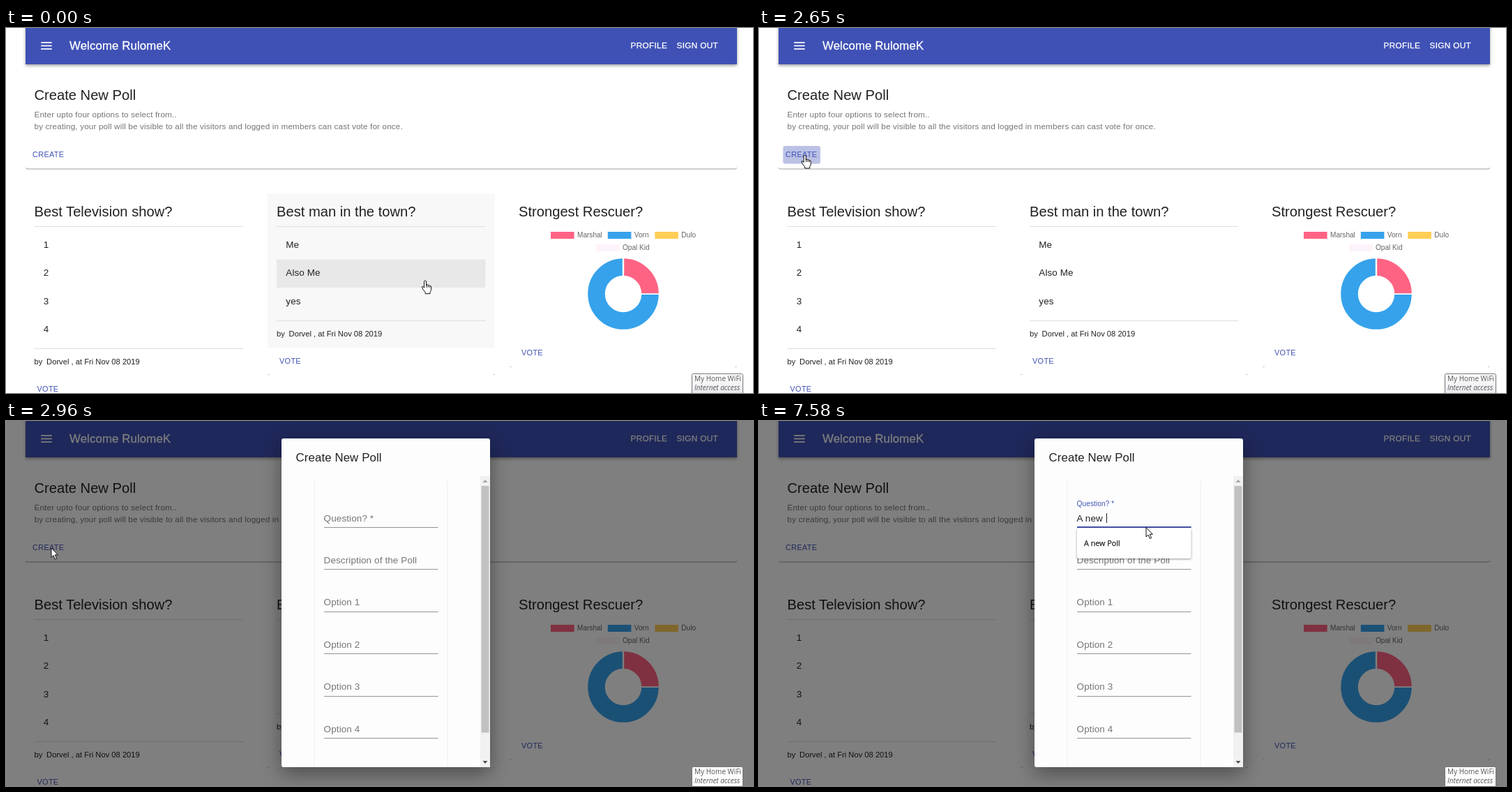
An HTML page for the animation above (8000 ms loop, 1071 by 523 pixels).

```html
<!DOCTYPE html>
<html lang="en">
<head>
<meta charset="utf-8">
<title>Poll board</title>
<style>
  html, body { margin: 0; width: 100%; height: 100%; overflow: hidden; background: #fff; }
  svg { display: block; width: 1071px; height: 523px; }
  text { font-family: "Liberation Sans", Arial, sans-serif; white-space: pre; }
  .ui { font-family: "Open Sans", "Noto Sans", sans-serif; }
  .bar { filter: drop-shadow(0 2px 2px rgba(0,0,0,.38)); }
  .card { filter: drop-shadow(0 1px .4px rgba(0,0,0,.38)); }
  .paper { filter: drop-shadow(0 9px 14px rgba(0,0,0,.4)); }
  .menu { filter: drop-shadow(0 1px 1.5px rgba(0,0,0,.4)); }
</style>
</head>
<body>
<script>
const LOOP = 8000, DARK = '#212121', GREY = '#757575', BLUE = '#3f51b5';

// ---- markup helpers ----
const rect = (x, y, w, h, fill, more = '') =>
  `<rect x="${x}" y="${y}" width="${w}" height="${h}" fill="${fill}" ${more}/>`;
// baselines sit on whole pixels
const text = (x, y, size, str, fill = DARK, spacing = 0, more = '') =>
  `<text x="${x}" y="${Math.floor(y)}" font-size="${size}" fill="${fill}" letter-spacing="${spacing * size}" ${more}>${str}</text>`;
const heading = (x, y, str) => text(x, y, 20.16, str);
const body = (x, y, str, fill, more) => text(x, y, 13.44, str, fill, .0094, more);
const note = (y, str) => text(40.5, y, 11.76, str, GREY, .0107);
const button = (x, y, str) => text(x, y, 10.92, str, BLUE, .0286);
const barText = (x, y, size, str, spacing) =>
  text(x, y, size, str, '#fff', spacing, 'stroke="#fff" stroke-width=".3"');

function pollCard(x, title, options) {
  const end = Math.floor(298.5 + options.length * 40.3);
  return heading(x, 270, title) +
    rect(x, 284, 299.5, 1, '#dedede') +
    options.map((o, i) => body(x + 13.3, 315.4 + i * 40.3, o)).join('') +
    rect(x, end, 299.5, 1, '#dedede') +
    text(x, end + 23, 11.2, 'by') +
    text(x + 17.6, end + 23, 11.2, 'Dorvel , at Fri Nov 08 2019') +
    button(x + 4, end + 62, 'VOTE');
}

const legend = (x, y, color, name) =>
  rect(x, y, 33.6, 10, color) + text(x + 38, y + 8, 10.08, name, '#666');

const corners = (x, y) => rect(x, y, 3, 1, '#ccc') + rect(x + 323, y, 3, 1, '#ccc');

const ring = (color, share, turn) =>
  `<circle cx="885" cy="381" r="38.5" fill="none" stroke="${color}" stroke-width="24.5" pathLength="4"
    stroke-dasharray="${share} 4" transform="rotate(${turn} 885 381)"/>`;

const field = (name, i) =>
  body(455.6, 144 + i * 60.4, name, GREY) + rect(456, Math.round(152 + i * 60.4), 163.5, 1, '#949494');

const page =
  rect(28, -10, 1020, 62, BLUE, 'class="bar"') +
  [20, 24.6, 29.2].map(y => rect(50.2, y, 15.5, 1.7, '#fff')).join('') +
  barText(91, 31, 16.8, 'Welcome RulomeK', .0075) +
  barText(895.5, 29, 11.76, 'PROFILE', .0286) +
  barText(961.5, 29, 11.76, 'SIGN OUT', .0286) +

  rect(28, 69, 1020, 132.5, '#fff', 'rx="3" class="card"') +
  heading(40.5, 103, 'Create New Poll') +
  note(128, 'Enter upto four options to select from..') +
  note(145, 'by creating, your poll will be visible to all the visitors and logged in members can cast vote for once.') +
  `<clipPath id="buttonClip">${rect(34.5, 169, 53.5, 25.5, '#000', 'rx="3"')}</clipPath>` +
  rect(34.5, 169, 53.5, 25.5, BLUE, 'rx="3" id="buttonHover"') +
  `<g clip-path="url(#buttonClip)"><circle id="ripple" cx="64.5" cy="182" fill="${BLUE}"/></g>` +
  button(38, 185, 'CREATE') +

  pollCard(40.5, 'Best Television show?', ['1', '2', '3', '4']) +
  rect(374.7, 237, 326.3, 222, '#000', 'id="cardHover"') +
  rect(388, 331.7, 299.5, 40.3, '#000', 'id="itemHover"') +
  rect(388, 291.4, 299.5, 40.3, '#000', 'id="firstHover"') +
  pollCard(388, 'Best man in the town?', ['Me', 'Also Me', 'yes']) +
  corners(375, 496) +

  heading(735, 270, 'Strongest Rescuer?') +
  legend(781, 292, '#ff6384', 'Marshal') +
  legend(862.8, 292, '#36a2eb', 'Vorn') +
  legend(930.3, 292, '#ffce56', 'Dulo') +
  legend(846, 310, '#fdf3fa', 'Opal Kid') +
  ring('#ff6384', 1, -90) + ring('#36a2eb', 3, 0) +
  rect(883.8, 329, 2.4, 28, '#fff') + rect(909, 380.2, 28, 1.8, '#fff') +
  button(739, 469, 'VOTE') +
  corners(722, 485);

const dialog =
  rect(395, 25, 299, 471, '#fdfdfd', 'rx="3" class="paper"') +
  text(415.5, 58, 16.8, 'Create New Poll', DARK, .0075) +
  rect(441.5, 86, 1, 410, '#efefef') + rect(632.5, 86, 1, 410, '#efefef') +
  rect(680, 79, 14, 417, '#f1f1f1') + rect(681.5, 93, 11, 353.5, '#c1c1c1') +
  '<path d="M683.5 88l3.5-4 3.5 4z" fill="#a3a3a3"/><path d="M683.5 487l3.5 4 3.5-4z" fill="#505050"/>' +
  ['Description of the Poll', 'Option 1', 'Option 2', 'Option 3', 'Option 4']
    .map((name, i) => field(name, i + 1)).join('') +
  body(0, 0, 'Question? *', GREY, 'id="label"') +
  rect(456, 152, 163.5, 1, '#949494', 'id="line"') +
  rect(0, 151.2, 0, 1.8, '#303f9f', 'id="focusLine"') +
  body(455.6, 144, '', DARK, 'id="typed"') +
  rect(0, 132, 1, 14, DARK, 'id="caret"') +
  '<g id="menu">' + rect(456, 154, 163.5, 43, '#fff', 'rx="2" class="menu"') +
  text(466, 179, 10.8, 'A new Poll', '#222', 0, 'class="ui" stroke="#222" stroke-width=".25"') + '</g>';

const tooltip =
  '<linearGradient id="tipShade" x2="0" y2="1"><stop stop-color="#fff"/><stop offset="1" stop-color="#e4e5ec"/></linearGradient>' +
  rect(983.5, 495.5, 73, 34, '', 'id="tip" rx="2" stroke="#767676"') +
  text(987, 506, 10, 'My Home WiFi', '#575757', 0, 'class="ui"') +
  text(987, 519, 10, 'Internet access', '#575757', 0, 'class="ui" font-style="italic"');

const pointer =
  '<g id="pointer"><circle id="click" r="10" cx="-.3" cy=".4" fill="#f7ee1c" opacity=".75"/>' +
  '<g fill="#fff" stroke="#111" stroke-linejoin="round">' +
  '<path id="arrow" d="M0 0V13.5L3.1 10.6 5.4 16 7.6 15 5.3 9.8H9.3Z"/>' +
  '<path id="hand" transform="translate(.7)" d="M-1.5 1.2Q0-.8 1.5 1.2V7l.6-.9q1.6-.6 2.3.8 1.6-.6 2.2.8 1.9-.3 2 1.5v4.5l-1.5 3v2.3h-7v-2L-3 13-4.6 10q-.3-2 1.8-1l1.3 1.5zM2 6v4M4.4 7v3M6.6 8v2"/>' +
  '<path id="beam" fill="none" d="M-2.5-5.5H0H3.5M.5-5.5V7M-2.5 7H3.5"/></g></g>';

document.body.innerHTML =
  `<svg viewBox="0 0 1071 523">${page}${rect(0, 0, 1071, 523, '#000', 'id="shade"')}
  <g id="dialog">${dialog}</g>${tooltip}${pointer}</svg>`;

// ---- motion helpers ----
const el = {};
document.querySelectorAll('[id]').forEach(n => el[n.id] = n);
const set = (id, attrs) => { for (const k in attrs) el[id].setAttribute(k, attrs[k]); };
const show = (id, on) => set(id, { visibility: on ? 'visible' : 'hidden' });
const within = (t, a, b) => t >= a && t < b;
const ramp = (t, a, b) => Math.min(1, Math.max(0, (t - a) / (b - a)));

// cubic-bezier(.4, 0, .2, 1)
function ease(x) {
  let lo = 0, hi = 1;
  for (let i = 0; i < 18; i++) {
    const s = (lo + hi) / 2, r = 1 - s;
    if (1.2 * r * r * s + .6 * r * s * s + s ** 3 < x) lo = s; else hi = s;
  }
  return lo * lo * (3 - 2 * lo);
}

const route = [[0, 601, 362], [440, 295, 230], [570, 295, 230], [1360, 65, 182],
  [3340, 65, 182], [3570, 357, 143], [3720, 357, 143], [4220, 555, 152.5], [LOOP, 555, 152.5]];
function pointerAt(t) {
  const i = Math.max(1, route.findIndex(k => t < k[0]));
  const [a, ax, ay] = route[i - 1], [b, bx, by] = route[i], p = ramp(t, a, b);
  return [ax + (bx - ax) * p, ay + (by - ay) * p];
}

const keys = [[6070, 'A'], [6150, 'A '], [7180, 'A n'], [7250, 'A ne'], [7410, 'A new'], [7580, 'A new ']];
const glyphs = document.createElement('canvas').getContext('2d');
glyphs.font = '13.44px "Liberation Sans", Arial, sans-serif';

function draw(t) {
  const [x, y] = pointerAt(t), open = t >= 2800;

  set('cardHover', { opacity: .027 * (1 - ramp(t, 290, 430)) });
  set('itemHover', { opacity: .065 * (1 - ramp(t, 90, 240)) });
  set('firstHover', { opacity: .065 * ramp(t, 100, 230) * (1 - ramp(t, 240, 390)) });
  set('buttonHover', { opacity: .08 * ramp(t, 1400, 1540) * (1 - ramp(t, 2810, 2950)) });
  set('ripple', { r: 46 * ease(ramp(t, 2170, 2650)), opacity: .3 * (1 - ramp(t, 2810, 2950)) });

  const fade = open ? ease(ramp(t, 2726, 2951)) : 0;
  set('shade', { opacity: fade / 2 });
  set('dialog', { opacity: fade });
  set('tip', { fill: open ? '#fdfdfd' : 'url(#tipShade)' });

  const focus = ease(ramp(t, 4370, 4570)), focused = t >= 4370;
  const overField = open && x > 456 && x < 620 && y > 131;
  set('label', {
    transform: `translate(455.6 ${144 - 22 * focus}) scale(${1 - focus / 4})`,
    fill: focused ? BLUE : GREY
  });
  set('line', { fill: overField ? DARK : '#949494' });
  set('focusLine', { x: 537.75 - 81.75 * focus, width: 163.5 * focus });

  const value = keys.reduce((s, [at, str]) => t >= at ? str : s, '');
  el.typed.textContent = value;
  set('caret', { x: Math.round(455.9 + glyphs.measureText(value).width + value.length * .126) });
  show('caret', focused && !within(t, 4900, 5420) && !within(t, 6680, 7180));
  show('menu', t >= 6070);

  const hand = within(t, 0, 380) || within(t, 1400, 2800);
  const beam = overField && t < 6070;
  show('hand', hand);
  show('beam', beam);
  show('arrow', !hand && !beam);
  show('click', within(t, 1990, 2220) || within(t, 4220, 4440));
  set('pointer', { transform: `translate(${x} ${y})` });
}

const start = performance.now();
function tick() {
  draw((performance.now() - start) % LOOP);
  requestAnimationFrame(tick);
}
tick();
</script>
</body>
</html>
```
